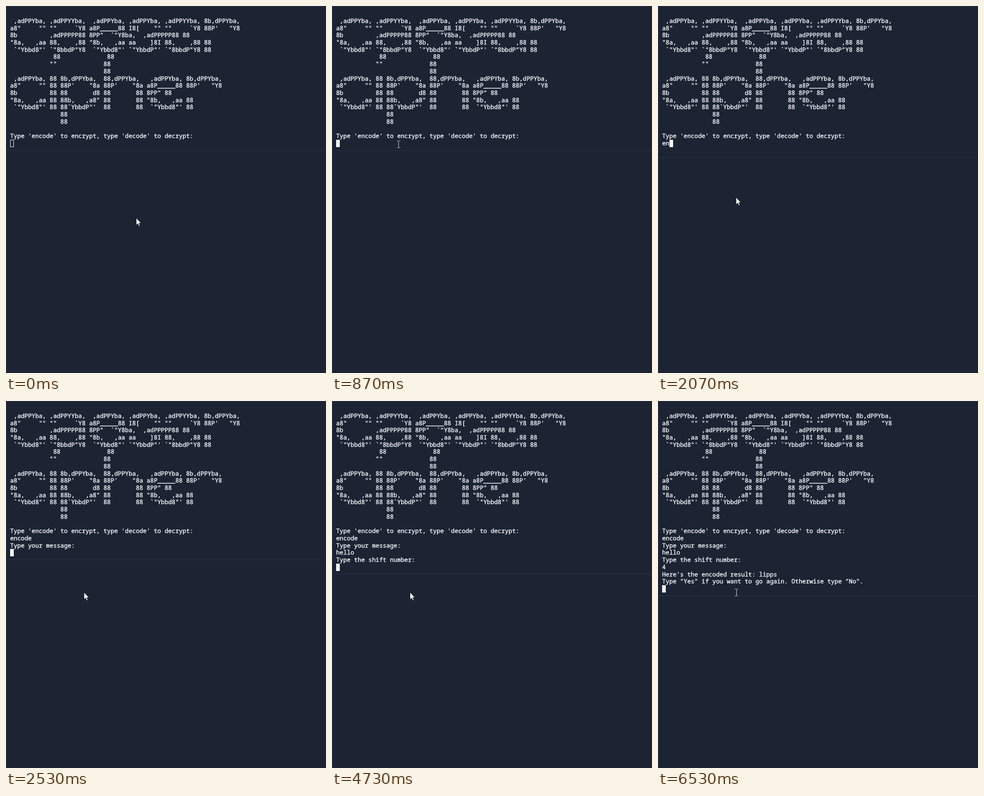
Write an HTML page that moves like this. It is 699x801 px and loops after 8 s.

```html
<!DOCTYPE html>
<html lang="en">
<head>
<meta charset="utf-8">
<title>Terminal session</title>
<style>
  html, body { margin: 0; width: 100%; height: 100%; overflow: hidden; background: #1c2333; }
  #stage { position: relative; width: 699px; height: 801px; overflow: hidden; }
  #stage > * { position: absolute; }
  .rule { left: 0; top: 0; background: #2b3245; }
  .side { width: 1px; height: 801px; }
  .top, #bottom { width: 696px; height: 1px; }
  pre {
    left: 9px; top: 24.8px; margin: 0; color: #f5f9fc;
    font: 13.092px/15.715px "Noto Sans Mono", "DejaVu Sans Mono", monospace;
    font-variant-ligatures: none; text-rendering: geometricPrecision;
    -webkit-text-stroke: .4px #f5f9fc;
  }
  #cursor { left: 0; top: 0; width: 8px; height: 16px; box-sizing: border-box; border: 1px solid #f5f9fc; }
  #cursor.on, #select { background: #f5f9fc; }
  #select { left: 158px; top: 292px; width: 518px; height: 16px; }
  #mouse { left: 0; top: 0; overflow: visible; }
</style>
</head>
<body>
<div id="stage">
  <div class="rule side"></div>
  <div class="rule top"></div>
  <div class="rule" id="bottom"></div>
<pre> ,adPPYba, ,adPPYYba,  ,adPPYba, ,adPPYba, ,adPPYYba, 8b,dPPYba,
a8"     "" ""     `Y8 a8P_____88 I8[    "" ""     `Y8 88P'   "Y8
8b         ,adPPPPP88 8PP"  `"Y8ba,  ,adPPPPP88 88
"8a,   ,aa 88,    ,88 "8b,   ,aa aa    ]8I 88,    ,88 88
 `"Ybbd8"' `"8bbdP"Y8  `"Ybbd8"' `"YbbdP"' `"8bbdP"Y8 88
            88             88
           ""             88
                          88
 ,adPPYba, 88 8b,dPPYba,  88,dPPYba,   ,adPPYba, 8b,dPPYba,
a8"     "" 88 88P'    "8a 88P'    "8a a8P_____88 88P'   "Y8
8b         88 88       d8 88       88 8PP" 88
"8a,   ,aa 88 88b,   ,a8" 88       88 "8b,   ,aa 88
 `"Ybbd8"' 88 88`YbbdP"'  88       88  `"Ybbd8"' 88
              88
              88

<span id="session"></span></pre>
  <div id="select"></div>
  <div id="cursor"></div>
  <svg id="mouse" width="12" height="20">
    <path id="arrow" d="M.5 .8V16.2L4.1 12.9L6.5 18.4L8.9 17.4L6.5 12H11.2Z" fill="#fff" stroke="#0b0e16" stroke-width=".8"/>
    <path id="beam" d="M-2 -6.5H.5L1.5 -5.5L2.5 -6.5H5M1.5 -5.5V7.5M-2 8.5H.5L1.5 7.5L2.5 8.5H5" fill="none" stroke="#dfe3e8"/>
  </svg>
</div>
<script>
const LOOP = 8000, COL = 7.855, ROW = 15.715, LEFT = 9, TOP = 24.8, FIRST_ROW = 16;
const $ = id => document.getElementById(id);

// Each event appends text at its time.
const events = [[0, "Type 'encode' to encrypt, type 'decode' to decrypt:\n"]];
[..."encode"].forEach((ch, i) => events.push([1870 + 110 * i, ch]));
events.push(
  [2530, "\nType your message:\n"],
  [3870, "h"], [3930, "e"], [4070, "l"], [4200, "l"], [4400, "o"],
  [4730, "\nType the shift number:\n"],
  [6130, "4"],
  [6530, "\nHere's the encoded result: lipps\nType \"Yes\" if you want to go again. Otherwise type \"No\".\n"]
);

// Pointer moves: start, end, steps, end x, end y
const start = [284, 462];
const moves = [
  [70, 330, 5, 155, 309],
  [600, 870, 5, 144, 301],
  [1070, 1270, 4, 170, 417]
];

function pointerAt(t) {
  let [x, y] = start;
  for (const [from, to, steps, endX, endY] of moves) {
    if (t < from) break;
    const gap = (to - from) / (steps - 1);
    const p = Math.min(1, (Math.floor((t - from) / gap + 1e-6) + 1) / steps);
    x += (endX - x) * p;
    y += (endY - y) * p;
  }
  return [Math.round(x), Math.round(y)];
}

const place = (el, x, y) => { el.style.transform = `translate(${x}px, ${y}px)`; };
const show = (el, on) => { el.style.visibility = on ? "visible" : "hidden"; };

let shown = null;
function draw(now) {
  const t = now % LOOP;
  const text = events.filter(e => e[0] <= t).map(e => e[1]).join("");
  if (text !== shown) $("session").textContent = shown = text;

  const lines = text.split("\n");
  const row = FIRST_ROW + lines.length - 1;
  const col = lines[lines.length - 1].length;
  place($("cursor"), Math.round(LEFT + col * COL), Math.round(TOP + row * ROW));
  $("cursor").className = t >= 470 ? "on" : "";

  // The panel grows by a spare row while input is being typed.
  const rows = row + 1 + (col > 0 ? 1 : 0);
  const bottom = Math.floor(TOP + rows * ROW + 7.4);
  place($("bottom"), 0, bottom);

  show($("select"), t >= 470 && t < 600);

  const [x, y] = pointerAt(t);
  const overText = y < bottom - 7;
  place($("mouse"), x, y);
  show($("arrow"), !overText);
  show($("beam"), overText);
}

const t0 = performance.now();
function tick() {
  draw(performance.now() - t0);
  requestAnimationFrame(tick);
}
tick();
</script>
</body>
</html>
```
